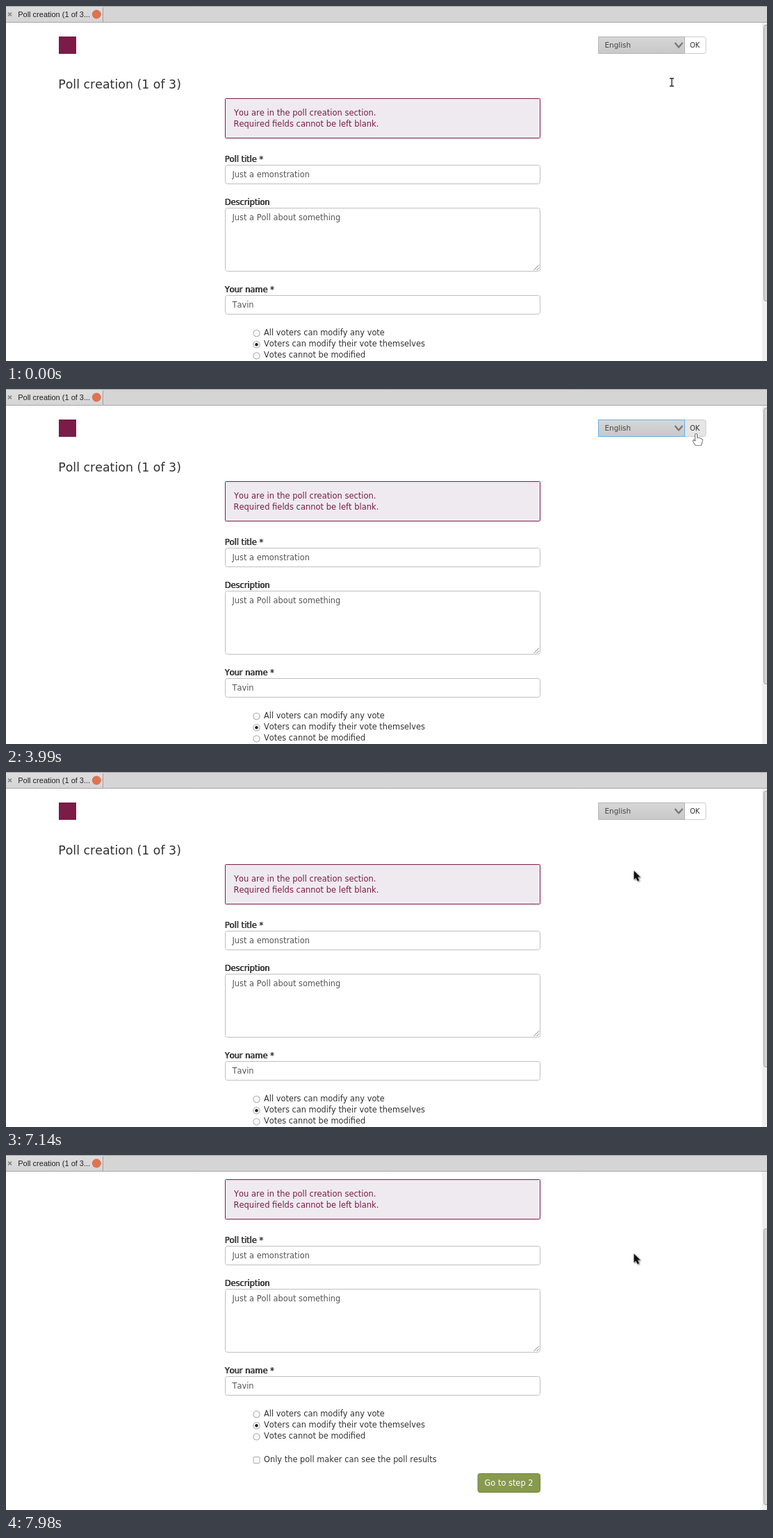
Write an HTML page with a canvas that moves like this. It is 1095x512 px and loops after 8000 ms.

```html
<!DOCTYPE html>
<html lang="en">
<head>
<meta charset="utf-8">
<title>Poll creation</title>
<style>
html, body { margin: 0; width: 100%; height: 100%; overflow: hidden; background: #fff; }
canvas { display: block; }
</style>
</head>
<body>
<canvas id="stage" width="1095" height="512"></canvas>
<script>
const LOOP = 8000, STEP = 70;
const ctx = document.getElementById('stage').getContext('2d');
const SANS = '"DejaVu Sans", sans-serif';
const UI = '"Liberation Sans", Arial, sans-serif';
const PLUM = '#7a1c47';
const LANGS = ['Français', 'English', 'Español', 'Deutsch', 'Italiano'];

// Each move: first step, last step, then the values reached
const POINTER = [
  [280, 560, 953, 57], [840, 840, 953, 56], [1750, 1750, 952, 56],
  [3500, 3710, 992, 64], [3920, 3990, 993, 65], [4200, 4200, 992, 65],
  [4480, 4480, 992, 64], [4620, 4620, 992, 63], [4760, 5040, 974, 59],
  [5320, 5320, 973, 60], [5460, 5600, 972, 62], [5670, 5740, 970, 59],
  [5880, 6090, 969, 61], [6440, 6440, 967, 63], [6510, 6720, 903, 142]
];
const SCROLL = [[7420, 7490, 32.5], [7630, 7770, 65], [7840, 7980, 98]];
const FOCUS = [[3220, 3290, 1], [7070, 7140, 0]];

function follow(start, moves, t) {
  let now = start;
  for (const [from, to, ...goal] of moves) {
    if (t < from) break;
    const p = Math.min(1, (t - from + STEP) / (to - from + STEP));
    const e = p * p * (3 - 2 * p);
    now = now.map((v, i) => v + (goal[i] - v) * e);
  }
  return now;
}

function text(str, x, y, size, color, family = SANS) {
  ctx.font = `${size}px ${family}`;
  ctx.fillStyle = color;
  ctx.fillText(str, x, y);
}

function label(str, y) {
  text(str, 314.4, y, 11.4, '#333');
  text(str, 315.2, y, 11.4, '#333');
}

function box(x, y, w, h, fill, stroke, r = 0) {
  ctx.beginPath();
  ctx.roundRect(x + 0.5, y + 0.5, w, h, r);
  ctx.fillStyle = fill;
  ctx.fill();
  ctx.strokeStyle = stroke;
  ctx.lineWidth = 1;
  ctx.stroke();
}

function line(points, color, width) {
  ctx.beginPath();
  points.forEach(([x, y]) => ctx.lineTo(x, y));
  ctx.strokeStyle = color;
  ctx.lineWidth = width;
  ctx.stroke();
}

function disc(x, y, r, fill) {
  ctx.beginPath();
  ctx.arc(x, y, r, 0, Math.PI * 2);
  ctx.fillStyle = fill;
  ctx.fill();
}

function vertical(y0, y1, c0, c1) {
  const g = ctx.createLinearGradient(0, y0, 0, y1);
  g.addColorStop(0, c0);
  g.addColorStop(1, c1);
  return g;
}

function field(str, y, h) {
  box(315, y, 453, h, '#fff', '#bfbfbf', 3);
  text(str, 325.5, y + 18, 11.4, '#555');
}

function radio(str, y, on) {
  disc(360.5, y - 3, 5.2, '#aaa');
  disc(360.5, y - 3, 4.2, '#f8f8f8');
  if (on) disc(360.5, y - 3, 2.2, '#222');
  text(str, 371, y, 11.4, '#333');
}

function header(hover, okHover, focus) {
  ctx.fillStyle = PLUM;
  ctx.fillRect(76, 44, 25, 25);
  const fill = hover ? vertical(45, 69, '#e6e6e6', '#d8d8d8') : vertical(45, 69, '#d6d6d6', '#c8c8c8');
  box(976, 44, 30.5, 24, okHover ? '#e6e6e6' : '#fff', '#ccc', [0, 3, 3, 0]);
  box(852, 44, 124, 24, fill, '#b4b4b4');
  if (focus > 0) {
    ctx.globalAlpha = focus;
    box(852, 44, 124, 24, fill, '#66afe9');
    ctx.globalAlpha = 1;
  }
  text('English', 861.5, 60, 10.4, '#444');
  line([[962.5, 53], [968, 59.5], [973.5, 53]], '#777', 2.2);
  text('OK', 984, 60, 10, '#333');
}

function page(state) {
  header(state.hover, state.okHover, state.focus);
  text('Poll creation (1 of 3)', 75.2, 119.2, 17.4, '#333');

  box(315, 133, 453, 57, '#efeaf0', PLUM, 1);
  text('You are in the poll creation section.', 328, 158, 11.5, PLUM);
  text('Required fields cannot be left blank.', 327.5, 174.2, 11.5, PLUM);

  label('Poll title *', 225);
  field('Just a emonstration', 229, 27);
  label('Description', 287);
  field('Just a Poll about something', 291, 91);
  for (const d of [3, 7]) line([[766.5 - d, 381], [767, 380.5 - d]], '#777', 1);
  label('Your name *', 413);
  field('Tavin', 417, 27);

  radio('All voters can modify any vote', 475, false);
  radio('Voters can modify their vote themselves', 491.2, true);
  radio('Votes cannot be modified', 507.4, false);
  box(355.5, 533, 9, 9, '#fafafa', '#aaa', 1);
  text('Only the poll maker can see the poll results', 371, 541.3, 11.4, '#333');
  box(678.5, 557, 89.5, 27, '#879a4e', '#71843c', 3);
  text('Go to step 2', 688.5, 575.2, 11.4, '#fff');
}

function tabBar() {
  ctx.fillStyle = '#d6d5d5';
  ctx.fillRect(0, 0, 1095, 24);
  ctx.fillStyle = vertical(1, 23, '#dedddd', '#d6d5d5');
  ctx.fillRect(0, 1, 140, 22);
  line([[0, 0.5], [1095, 0.5]], '#a3a3a3', 1);
  line([[0, 23.5], [1095, 23.5]], '#a6a6a6', 1);
  line([[139.5, 2], [139.5, 23]], '#a0a0a0', 1);
  line([[3, 9.5], [8, 14.5]], '#858585', 1.7);
  line([[8, 9.5], [3, 14.5]], '#858585', 1.7);
  text('Poll creation (1 of 3...', 17.2, 16, 11, '#222', UI);
  disc(130.3, 12, 6.5, '#dd7350');
}

function scrollbar(scroll) {
  ctx.fillStyle = '#efefef';
  ctx.fillRect(1088, 24, 7, 488);
  box(1090, 27 + scroll * 0.805, 12, 398, '#d4d4d4', '#a0a0a0', 3);
}

function menu() {
  ctx.save();
  ctx.shadowColor = 'rgba(0,0,0,.4)';
  ctx.shadowBlur = 8;
  ctx.shadowOffsetY = 3;
  ctx.fillStyle = '#f2f2f2';
  ctx.fillRect(852, 35, 125, 85);
  ctx.restore();
  box(852, 35, 124, 84, '#f2f2f2', '#999');
  ctx.fillStyle = vertical(52, 69, '#5facf3', '#3a8ade');
  ctx.fillRect(853, 52, 123, 17);
  LANGS.forEach((s, i) => text(s, 869.5, 47.5 + i * 17, 11, i === 1 ? '#fff' : '#333', UI));
}

function outline(points, x, y, fill, stroke) {
  ctx.beginPath();
  points.forEach(([px, py]) => ctx.lineTo(x + px, y + py));
  ctx.closePath();
  ctx.lineJoin = 'round';
  ctx.strokeStyle = stroke;
  ctx.lineWidth = 1.2;
  ctx.stroke();
  ctx.fillStyle = fill;
  ctx.fill();
}

function arrow(x, y) {
  ctx.save();
  ctx.shadowColor = 'rgba(0,0,0,.35)';
  ctx.shadowBlur = 2;
  ctx.shadowOffsetX = ctx.shadowOffsetY = 1;
  outline([[0.5, 0.5], [0.5, 13], [3.4, 10.4], [5.6, 15.3], [7.9, 14.3], [5.8, 9.5], [9.5, 9.2]],
    x, y, '#111', '#eee');
  ctx.restore();
}

function hand(x, y) {
  outline([[-1, 0], [1, 0], [1.5, 6], [4, 5.5], [6.5, 6.5], [9, 8], [8.5, 12], [7, 16],
    [-1, 16], [-4.5, 10], [-3.5, 8.5], [-1, 10.5]], x, y, '#fff', '#111');
}

function beam(x, y) {
  const marks = [[[-3, -5.5], [3, -5.5]], [[0, -5.5], [0, 5.5]], [[-3, 5.5], [3, 5.5]]];
  for (const [color, w] of [['#ddd', 3], ['#222', 1.2]])
    for (const m of marks) line(m.map(([a, b]) => [x + a, y + b]), color, w);
}

function draw(time) {
  const t = Math.floor(time / STEP) * STEP;
  const [x, y] = follow([958, 110], POINTER, t);
  const [scroll] = follow([0], SCROLL, t);
  const [focus] = follow([0], FOCUS, t);
  const inRow = y >= 44 && y < 69 && scroll === 0;
  const okHover = inRow && x > 976;

  ctx.fontKerning = 'none';
  ctx.fillStyle = '#fff';
  ctx.fillRect(0, 0, 1095, 512);
  ctx.save();
  ctx.translate(0, -scroll);
  page({ hover: inRow && x <= 976, okHover, focus });
  ctx.restore();
  tabBar();
  scrollbar(scroll);
  if (t >= 1120 && t < 3150) menu();

  if (okHover) hand(x, y);
  else if (t < 560 && y > 98) beam(x, y);
  else arrow(x, y);
}

function tick() {
  draw(performance.now() % LOOP);
  requestAnimationFrame(tick);
}
tick();
</script>
</body>
</html>
```
